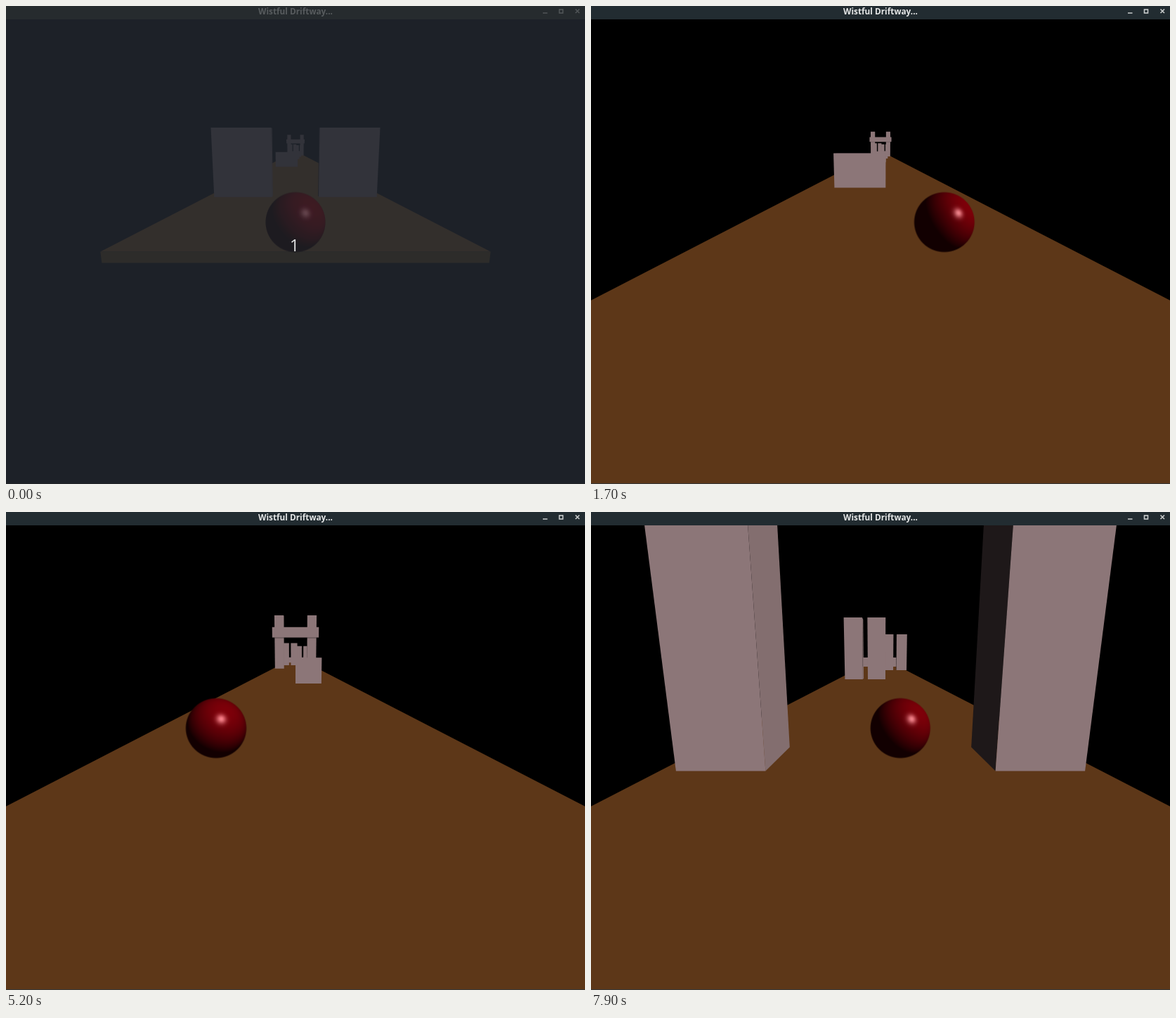
An HTML page with a canvas for the animation above (8 s loop, 824x680 px).

```html
<!DOCTYPE html>
<html lang="en">
<head>
<meta charset="utf-8">
<title>Wistful Driftway...</title>
<style>
  html, body { margin: 0; width: 100%; height: 100%; overflow: hidden; background: #000; }
  canvas, svg { position: absolute; left: 0; top: 0; display: block; }
  text { font-family: "Open Sans", "Noto Sans", sans-serif; text-anchor: middle; }
</style>
</head>
<body>
<canvas id="scene" width="824" height="680"></canvas>
<svg width="824" height="680" viewBox="0 0 824 680">
  <rect id="bar" width="824" height="19"/>
  <g id="chrome">
    <text x="412" y="11.5" font-size="11.8" font-weight="700" fill="#e4e6e6">Wistful Driftway...</text>
    <g fill="none" stroke="#c9cccc" stroke-width="1.6">
      <path d="M764 10H770.5M810.5 4.5L816 10M816 4.5L810.5 10"/>
      <rect x="787.5" y="5" width="5" height="5"/>
    </g>
  </g>
  <text id="count" x="410.5" y="349" font-size="24" fill="#e0e0e0">1</text>
</svg>
<script>
const LOOP = 8000, STEP = 100;
const CX = 412, CY = 349.5, FOCAL = 572.4;
const PITCH = Math.atan(0.25), COS = Math.cos(PITCH), SIN = Math.sin(PITCH);
const NEAR = 0.05, BALL_Z = 4;

const el = id => document.getElementById(id);
const ctx = el('scene').getContext('2d');

// Seconds and distance from the camera to the gate
const TRAVEL = [[0.4, 94.3], [0.9, 88.3], [2.6, 68], [4.3, 48], [5.2, 37.2], [6.3, 23.75], [7.9, 3.5]];
// Seconds and sideways position of the ball
const STEER = [[1.2, 0], [1.9, 0.9], [2.9, 0.9], [4.1, -1.2], [4.6, -1.2], [4.9, -0.8], [7, -0.8], [7.6, 0.2]];

const COLORS = { front: '#8c7678', right: '#836e6f', left: '#1e1819', top: '#8c7678', bottom: '#1e1819' };

// z is measured from the gate; a box leaves the scene when nearer than "gone"
const box = (z, x0, x1, y1, depth = 1, y0 = 0, gone = 1) => ({ z, x0, x1, y0, y1, depth, gone });
const BOXES = [
  box(41, -1.9, 1.9, 0.95),
  box(28.9, 0.2, 1, 2.7), box(28.9, 1.25, 2.05, 2.7),
  box(15.5, -1.65, -0.82, 2.72), box(15.5, -0.587, 0.228, 2.72),
  box(0, -1.85, -1.04, 4.55), box(0, 1.04, 1.85, 4.55),
  box(-0.03, -2.06, 2.06, 3.56, 1, 2.69),
  box(-21.28, 0, 1.01, 0.98, 1, 0, 2.5),
  box(-40.46, -0.5, 0.5, 0.943),
  box(-67.3, -1.3, 0.145, 0.943),
  box(-85.24, -1.825, -0.5225, 1.49, 0.295), box(-85.24, 0.5225, 1.825, 1.49, 0.295)
];

function keyed(keys, t) {
  if (t <= keys[0][0]) return keys[0][1];
  for (let i = 1; i < keys.length; i++) {
    const [t0, a] = keys[i - 1], [t1, b] = keys[i];
    if (t <= t1) return a + (b - a) * (t - t0) / (t1 - t0);
  }
  return keys[keys.length - 1][1];
}

// World point: x sideways, y above the floor, z forward
function toCamera([x, y, z]) {
  const drop = 1 - y;
  return [x, drop * COS - z * SIN, z * COS + drop * SIN];
}

function clipNear(points) {
  const out = [];
  points.forEach((p, i) => {
    const q = points[(i + 1) % points.length];
    if (p[2] >= NEAR) out.push(p);
    if ((p[2] >= NEAR) !== (q[2] >= NEAR)) {
      const k = (NEAR - p[2]) / (q[2] - p[2]);
      out.push(p.map((v, j) => v + (q[j] - v) * k));
    }
  });
  return out;
}

function face(color, ...corners) {
  const points = clipNear(corners.map(toCamera));
  if (points.length < 3) return;
  ctx.beginPath();
  for (const [x, y, z] of points) ctx.lineTo(CX + FOCAL * x / z, CY + FOCAL * y / z);
  ctx.fillStyle = color;
  ctx.fill();
}

function drawBox({ x0, x1, y0, y1, depth }, near, c = COLORS) {
  const far = near + depth;
  const side = (color, x) => face(color, [x, y0, near], [x, y1, near], [x, y1, far], [x, y0, far]);
  const slab = (color, y) => face(color, [x0, y, near], [x1, y, near], [x1, y, far], [x0, y, far]);
  if (x1 < 0) side(c.right, x1);
  if (x0 > 0) side(c.left, x0);
  if (y1 < 1) slab(c.top, y1);
  if (y0 > 1) slab(c.bottom, y0);
  face(c.front, [x0, y0, near], [x1, y0, near], [x1, y1, near], [x0, y1, near]);
}

const SIZE = 90, RADIUS = 42.5;
const ballCanvas = document.createElement('canvas');
ballCanvas.width = ballCanvas.height = SIZE;
const ballCtx = ballCanvas.getContext('2d');
const pixels = ballCtx.createImageData(SIZE, SIZE);

// Diffuse and specular shading around the highlight normal h
function shadeBall(x) {
  const hx = (14.3 + 8.8 * x) / RADIUS, hy = -13 / RADIUS;
  const hz = Math.sqrt(1 - hx * hx - hy * hy);
  const light = [2 * hz * hx, 2 * hz * hy, 2 * hz * hz - 1];
  for (let j = 0; j < SIZE; j++) for (let i = 0; i < SIZE; i++) {
    const dx = i + 0.5 - SIZE / 2, dy = j + 0.5 - SIZE / 2;
    const r = Math.hypot(dx, dy), k = 1 / Math.max(r, RADIUS);
    const nx = dx * k, ny = dy * k, nz = Math.sqrt(Math.max(0, 1 - nx * nx - ny * ny));
    const diffuse = Math.max(0, nx * light[0] + ny * light[1] + nz * light[2]);
    const shine = 130 * Math.pow(Math.max(0, nx * hx + ny * hy + nz * hz), 75);
    const o = 4 * (j * SIZE + i);
    pixels.data[o] = 18 + 108 * diffuse + shine;
    pixels.data[o + 1] = shine;
    pixels.data[o + 2] = 1 + 8 * diffuse + shine;
    pixels.data[o + 3] = 255 * Math.min(1, Math.max(0, RADIUS + 0.5 - r));
  }
  ballCtx.putImageData(pixels, 0, 0);
}

function drawBall(x) {
  const w = SIZE * (1 + 0.022 * x * x);
  ctx.drawImage(ballCanvas, CX + 141.3 * x - w / 2, 307.5 - SIZE / 2, w, SIZE);
}

function draw(ms) {
  const t = Math.floor(ms / STEP) * STEP / 1000;
  const paused = t < 0.1;
  const gate = keyed(TRAVEL, t), ballX = keyed(STEER, t);

  ctx.fillStyle = '#000';
  ctx.fillRect(0, 0, 824, 680);

  const floor = box(0, -2, 2, 0, 200, -0.12);
  drawBox(floor, gate - 90.3, paused
    ? { top: '#965c19', front: '#6b490d' }
    : { top: '#5d3718', front: '#462a12' });

  shadeBall(ballX);
  let ballDone = false;
  for (const b of BOXES) {
    const near = gate + b.z;
    if (near < b.gone) continue;
    if (!ballDone && near + b.depth / 2 < BALL_Z) {
      drawBall(ballX);
      ballDone = true;
    }
    drawBox(b, near);
  }
  if (!ballDone) drawBall(ballX);

  if (paused) {
    ctx.fillStyle = 'rgba(35,39,47,0.85)';
    ctx.fillRect(0, 0, 824, 680);
    ctx.globalAlpha = 0.18;
    drawBall(ballX);
    ctx.globalAlpha = 1;
  }
  ctx.fillStyle = paused ? '#24262a' : '#383a3a';
  ctx.fillRect(0, 679, 824, 1);

  el('bar').setAttribute('fill', paused ? '#262b2e' : '#222c31');
  el('chrome').setAttribute('opacity', paused ? 0.26 : 1);
  el('count').setAttribute('visibility', paused ? 'visible' : 'hidden');
}

const start = performance.now();
function tick() {
  draw((performance.now() - start) % LOOP);
  requestAnimationFrame(tick);
}
tick();
</script>
</body>
</html>
```
